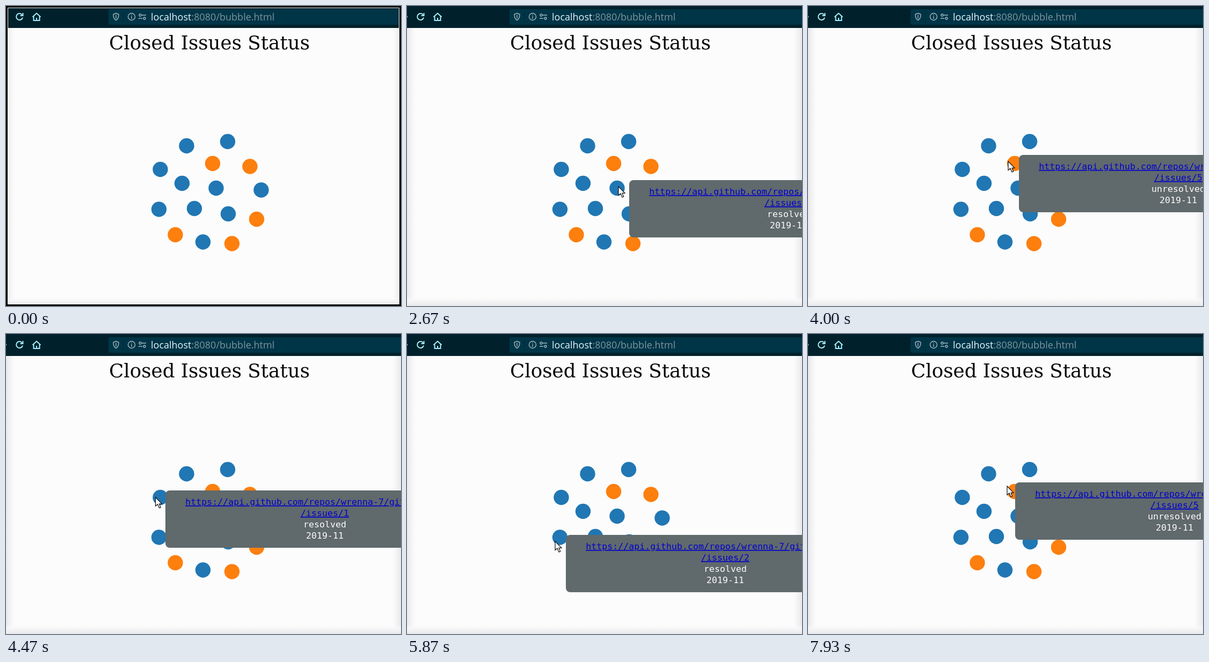
Recreate the animation shown at these times as an HTML page. Size 736 px wide and 560 px high, loop 8 s.

```html
<!DOCTYPE html>
<html lang="en">
<head>
<meta charset="utf-8">
<title>Closed Issues Status</title>
<style>
  html, body { margin: 0; height: 100%; overflow: hidden; }
  svg { display: block; width: 736px; height: 560px; background: #fcfcfc; }
  .title { font: 35.7px "DejaVu Serif", serif; fill: #080808; }
  .address { font: 18px "Open Sans", sans-serif; fill: #7c959f; }
  .host { fill: #e2f8ff; }
  .tip { font: 16.6px "DejaVu Sans Mono", monospace; fill: #fcfcfc; text-anchor: middle; }
  .link { fill: #0000d0; text-decoration: underline; }
  .icon { fill: none; stroke: #a4f0ff; stroke-width: 2; }
  .dim { stroke: #a3b6be; stroke-width: 1.4; }
</style>
</head>
<body>
<svg viewBox="0 0 736 560">
  <defs>
    <linearGradient id="glow">
      <stop offset="0" stop-color="#e9e9ec"/>
      <stop offset=".5" stop-color="#f4f4f6"/>
      <stop offset="1" stop-color="#fcfcfc" stop-opacity="0"/>
    </linearGradient>
  </defs>

  <g fill="url(#glow)">
    <rect width="18" height="519" transform="translate(0 41)"/>
    <rect width="18" height="519" transform="translate(736 41) scale(-1 1)"/>
    <rect width="18" height="736" transform="translate(0 560) rotate(-90)"/>
  </g>

  <rect width="736" height="41" fill="#00212b"/>
  <rect x="191" y="6" width="560" height="29" rx="3" fill="#003547"/>
  <path d="M219 9v23" stroke="#002834"/>
  <g class="icon">
    <path d="M0 20h1"/>
    <path d="M30 16.5a6 6 0 1 0 1 5M31.5 13v5h-5"/>
    <path d="M49.5 20.5L57 13.5l7.5 7M51.5 19.5V27h11V19.5M57 27v-5"/>
  </g>
  <g class="icon dim">
    <path d="M205 13.5l5 2c0 5-1 9-5 11c-4-2-5-6-5-11zM205 16.5v7"/>
    <circle cx="234" cy="20" r="6.5"/>
    <path d="M234 19v5M234 16v1.6M253 17h8M247 23h7"/>
    <circle cx="250" cy="17" r="2"/>
    <circle cx="258" cy="23" r="2"/>
  </g>
  <text class="address" x="270" y="27"><tspan class="host">localhost</tspan>:8080/bubble.html</text>
  <text class="title" x="192" y="81">Closed Issues Status</text>

  <g id="bubbles"></g>
  <g id="tip" class="tip">
    <rect width="594" height="107" rx="8" fill="#60696b"/>
    <text class="link" x="297" y="27">https://api.github.com/repos/wrenna-7/git-issue-demo</text>
    <text class="link" x="297" y="48" id="issue"></text>
    <text x="297" y="69" id="status"></text>
    <text x="297" y="90">2019-11</text>
  </g>
  <path id="cursor" d="M0 0V16.5L4 13L7 20L9.7 19L7 12.3H12Z" fill="#fcfcfc" stroke="#111" stroke-width="1.2"/>
  <g id="frame" fill="none">
    <rect x="1.5" y="1.5" width="733" height="557" stroke="#000" stroke-width="3"/>
    <rect x="3.5" y="3.5" width="729" height="553" stroke="#fff"/>
  </g>
</svg>
<script>
const LOOP = 8000, STEPS = 120, GLIDE = 5, REACH = 20;
const el = id => document.getElementById(id);

// Bubble centres in issue order
const bubbles = [[287.5, 305], [285, 379.5], [328, 331], [391.5, 340], [385, 294],
  [454.5, 299.5], [467, 398], [315.5, 427], [421, 443.5], [475.5, 343.5],
  [336.5, 261], [413, 253], [351, 378], [414, 388], [367, 440.5]];
const isOpen = issue => issue >= 5 && issue <= 9;

el('bubbles').innerHTML = bubbles.map(([x, y], i) =>
  `<circle cx="${x}" cy="${y}" r="14.2" fill="${isOpen(i + 1) ? '#fd7f0e' : '#2077b3'}"/>`).join('');

// Pointer stops: arrival step, x, y
const stops = [[9, 640, 322], [11, 520, 305], [17, 480, 334], [27, 394, 337],
  [45, 373, 290], [66, 277, 304], [69, 283, 307], [88, 276, 387], [95, 304, 389],
  [99, 600, 420], [104, 352, 549], [117, 366, 289], [119, 371, 284]];

// A tooltip opens beside the pointer when it reaches another bubble
const tips = [];
for (const [from, x, y] of stops) {
  const issue = 1 + bubbles.findIndex(([bx, by]) => Math.hypot(x - bx, y - by) < REACH);
  if (issue && issue !== tips.at(-1)?.issue) tips.push({ from, issue, x: x + 20, y: y - 12 });
}

function pointerAt(step) {
  const next = Math.max(1, stops.findIndex(s => s[0] >= step));
  const [a, ax, ay] = stops[next - 1], [b, bx, by] = stops[next];
  const u = Math.max(0, 1 - (b - step) / Math.min(GLIDE, b - a));
  const k = u * u * (3 - 2 * u);
  return [ax + (bx - ax) * k, ay + (by - ay) * k];
}

const place = (node, x, y) => node.setAttribute('transform', `translate(${x} ${y})`);
const show = (node, on) => node.setAttribute('visibility', on ? 'visible' : 'hidden');

function render(ms) {
  const step = Math.floor((ms + 4) % LOOP * STEPS / LOOP);
  el('frame').setAttribute('opacity', Math.max(0, 1 - step / 3));

  show(el('cursor'), step >= stops[0][0]);
  place(el('cursor'), ...pointerAt(step));

  const tip = tips.findLast(t => t.from <= step);
  show(el('tip'), tip);
  if (tip) {
    place(el('tip'), tip.x, tip.y);
    el('issue').textContent = '/issues/' + tip.issue;
    el('status').textContent = isOpen(tip.issue) ? 'unresolved' : 'resolved';
  }
}

const start = performance.now();
function tick() {
  render(performance.now() - start);
  requestAnimationFrame(tick);
}
tick();
</script>
</body>
</html>
```
